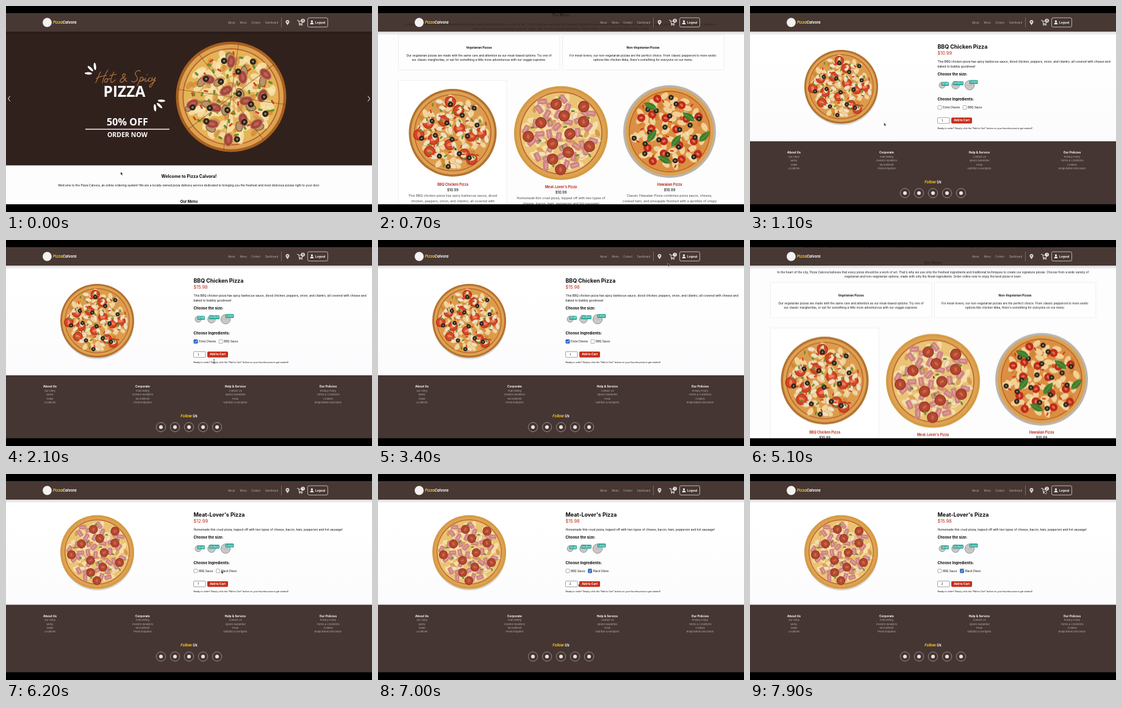
An HTML page for the animation above (8000 ms loop, 600 by 338 pixels).

```html
<!DOCTYPE html>
<html lang="en">
<head>
<meta charset="utf-8">
<title>Pizza ordering</title>
<style>
html, body { margin: 0; width: 100%; height: 100%; overflow: hidden; background: #000; }
svg { display: block; width: 100vw; height: 100vh; }
text { font-family: Inter, "Open Sans", sans-serif; fill: #0b0b0c; white-space: pre; }
.m { text-anchor: middle; }
.b { font-weight: 700; }
.l { font-weight: 300; fill: #d3cccb; }
.i { font-style: italic; }
.w { fill: #fff; }
.red { fill: #b92a17; }
.grey { fill: #45454a; }
.yellow { fill: #fcc419; }
.hero { font-family: "Open Sans", sans-serif; font-weight: 700; fill: #fff; text-anchor: middle; }
.line { fill: none; stroke: #fff; stroke-linecap: round; stroke-linejoin: round; }
#scroll { animation: scroll 8s infinite; }
#cursor { animation: cursor 8s infinite ease-in-out; }
@keyframes scroll {
  0%, 1.25% { transform: translateY(0); animation-timing-function: ease-in-out; }
  8%, 49.9% { transform: translateY(-306px); animation-timing-function: step-end; }
  50%, 58.5% { transform: translateY(0); animation-timing-function: ease-in-out; }
  65%, 100% { transform: translateY(-306px); }
}
@keyframes cursor {
  0%, 2% { transform: translate(188px, 272px); }
  8%, 12% { transform: translate(126px, 232px); }
  16%, 18% { transform: translate(361px, 130px); }
  21%, 23% { transform: translate(311px, 166px); }
  26%, 27% { transform: translate(341px, 196px); }
  30%, 33% { transform: translate(347px, 187px); }
  42.5% { transform: translate(475px, 38px); }
  48%, 50.5% { transform: translate(92px, 27px); }
  56.5%, 59% { transform: translate(266px, 273px); }
  64%, 68% { transform: translate(300px, 222px); }
  71%, 73% { transform: translate(361px, 122px); }
  77.5% { transform: translate(353px, 158px); }
  79%, 81% { transform: translate(348px, 158px); }
  84.5%, 86.5% { transform: translate(323px, 180px); }
  89.5%, 92% { transform: translate(347px, 180px); }
  98%, 100% { transform: translate(483px, 27px); }
}
</style>
</head>
<body>
<svg id="stage" viewBox="0 0 600 338" preserveAspectRatio="none"></svg>
<script>
const LOOP = 8000;
const BRAND = 'Calvora';

// y is the middle of the capitals
const text = (x, y, size, str, cls = '') =>
  `<text x="${x}" y="${y + size * .355}" font-size="${size}" class="${cls}">${str}</text>`;
const rect = (x, y, w, h, fill, extra = '') =>
  `<rect x="${x}" y="${y}" width="${w}" height="${h}" fill="${fill}" ${extra}/>`;
const disc = (x, y, r, fill, extra = '') =>
  `<circle cx="${x}" cy="${y}" r="${r}" fill="${fill}" ${extra}/>`;
const oval = (rx, ry, fill, extra = '') => `<ellipse rx="${rx}" ry="${ry}" fill="${fill}" ${extra}/>`;
const path = (d, cls = '', extra = '') => `<path d="${d}" class="${cls}" ${extra}/>`;
const place = (id, x, y, r) => `<use href="#${id}" transform="translate(${x} ${y}) scale(${r / 50})"/>`;
const on = (times, body) => `<g data-on="${times}">${body}</g>`;
const range = n => [...Array(n).keys()];

function random(seed) {
  return () => {
    seed = (seed + 0x6D2B79F5) | 0;
    let v = Math.imul(seed ^ seed >>> 15, 1 | seed);
    v = v + Math.imul(v ^ v >>> 7, 61 | v) ^ v;
    return ((v ^ v >>> 14) >>> 0) / 4294967296;
  };
}

const toppings = {
  cheese: oval(5, 3, '#f8e7b4', 'opacity=".75"'),
  toast: oval(4, 2.4, '#c97a2c', 'opacity=".55"'),
  pepperoni: disc(0, 0, 5.6, '#b4472f', 'stroke="#8c3020" stroke-width=".8"') + oval(2.5, 1.5, '#cb6648'),
  sausage: oval(6, 4, '#a5463d', 'stroke="#c98a63" stroke-width=".8"') + oval(3, 1.5, '#ba6052'),
  ham: rect(-5, -3, 10, 6, '#cf8583', 'rx="1.5"') + rect(-3, -1, 6, 1.2, '#e3a8a0'),
  tomato: disc(0, 0, 6, '#d4452b', 'stroke="#b23019" stroke-width="1"') + oval(3.4, 1.8, '#ec8055'),
  cherry: disc(0, 0, 4.4, '#bf2b1c') + oval(2, 1.2, '#e4704f'),
  olive: disc(0, 0, 2.8, '#29231e') + disc(0, 0, 1.1, '#8d7a4c'),
  basil: path('M-8 0Q-2-7 8 0Q-1 7-8 0', '', 'fill="#3f7d2c"') + rect(-7, -.3, 13, .6, '#6ba24c'),
  mushroom: oval(4.6, 3, '#b99268', 'stroke="#7a5a3c" stroke-width=".7"'),
  chicken: oval(4.4, 2.6, '#f1dfc0', 'stroke="#cfa36b" stroke-width=".5"'),
  green: rect(-2, -1, 4, 2, '#6c8f2f', 'rx=".8"'),
  pepper: rect(-2, -.8, 4, 1.6, '#cf3f20', 'rx=".6"')
};

function pizza(id, seed, crust, base, list) {
  const rnd = random(seed);
  let out = disc(0, 0, 50, crust) + disc(0, 0, 47.5, '#dda252') + disc(0, 0, 44, '#b9602a') + disc(0, 0, 43, base);
  for (const [kind, count] of list) {
    const turn = rnd() * 6.28;
    for (const i of range(count)) {
      const a = turn + i * 2.4 + rnd() * .5, r = 39.5 * Math.sqrt((i + .4 + rnd() * .3) / count);
      out += `<g transform="translate(${r * Math.cos(a)} ${r * Math.sin(a)}) rotate(${rnd() * 360})">${toppings[kind]}</g>`;
    }
  }
  return `<g id="${id}">${out}</g>`;
}

const slices = range(4).map(i => rect(-50, -.3, 100, .6, '#7a4218', `opacity=".6" transform="rotate(${i * 45 + 8})"`)).join('');
const petals = [2, 44, 84].map(a => `<ellipse cx="12" rx="6" ry="2" fill="#fff" transform="rotate(${a})"/>`).join('');

const defs = `<defs>
  <linearGradient id="shade" x2="0" y2="1"><stop stop-opacity=".16"/><stop offset="1" stop-opacity="0"/></linearGradient>
  <linearGradient id="paper" x2="0" y2="1"><stop offset=".2" stop-color="#fff"/><stop offset="1" stop-color="#f9f9fc"/></linearGradient>
  <g id="petals">${petals}</g><g id="slices">${slices}</g>
  ${pizza('spicy', 4, '#a9601f', '#e5b457', [['cheese', 75], ['toast', 34], ['pepper', 30], ['green', 46], ['mushroom', 13], ['sausage', 13], ['olive', 15]])}
  ${pizza('bbq', 11, '#b5712f', '#dd9c4c', [['cheese', 46], ['toast', 26], ['tomato', 13], ['chicken', 36], ['pepper', 30], ['green', 28], ['olive', 14]])}
  ${pizza('meat', 23, '#d59a42', '#eac374', [['cheese', 60], ['toast', 16], ['chicken', 18], ['ham', 36], ['pepperoni', 12], ['green', 12]])}
  ${pizza('hawaiian', 37, '#b9b4ae', '#dc8f42', [['toast', 30], ['cheese', 56], ['pepper', 20], ['cherry', 17], ['olive', 19], ['basil', 6]])}
</defs>`;

const script = [
  'M155 108c-3 6-5 12-8 18M167 105c-5 8-8 15-9 21M148 119c6-4 12-4 17-5',
  'M165 119c-4 1-5 6-2 6 4 0 5-6 2-6 2 2 4 1 6 0',
  'M177 108c-3 6-6 14-5 17 2 2 5-2 7-4M170 114c4-1 8-1 11-2',
  'M198 124c-4-4-9-9-6-12 3-2 5 1 2 4-4 3-8 5-7 8 2 3 7-1 10-6',
  'M220 107c-3-3-9 1-8 5 1 3 5 5 3 9-2 4-8 5-9 2',
  'M221 117c-2 5-4 10-6 14M220 119c3-4 6-2 4 2-1 3-4 3-5 2 4 1 6-1 8-3',
  'M229 118c-1 3-2 6 0 6 2 0 3-2 4-3M231 113l.5-.5',
  'M237 118c-3-1-5 5-2 6 2 0 4-2 5-3',
  'M240 117c-2 4 0 6 2 4l3-4c-2 6-4 13-8 16-3 1-2-3 1-5l7-6'
].join('');

const hero = rect(0, 42, 600, 219.5, '#31211d')
  + `<use href="#petals" transform="translate(147 111) rotate(180)"/><use href="#petals" transform="translate(243 155)"/>`
  + path(script, 'line', 'style="stroke:#b9783c" stroke-width="1.1" role="img" aria-label="Hot &amp; Spicy"')
  + text(194, 140.5, 24.6, 'PIZZA', 'hero')
  + text(199, 190.5, 16.2, '50% OFF', 'hero')
  + rect(130, 201.5, 138, 1.4, '#fff')
  + text(199, 211, 10.6, 'ORDER NOW', 'hero')
  + place('spicy', 369, 149, 90.5) + place('slices', 369, 149, 88)
  + path('M6.5 148l-3 4 3 4M593.5 148l3 4-3 4', 'line', 'stroke-width="1"');

const panel = (x, title, lines) =>
  rect(x, 353, 264.5, 58, '#fefefe', 'rx="2" stroke="#e7e7ec" stroke-width=".7"')
  + text(x + 132, 374.5, 4.8, title, 'm b')
  + lines.map((s, i) => text(x + 132, 387 + i * 7.5, 4.85, s, 'm')).join('');

const card = (id, x, y, r, top, title, lines) =>
  place(id, x, y, r) + text(x, top, 5.5, title, 'm b red') + text(x, top + 9, 5.6, '$10.99', 'm b grey')
  + lines.map((s, i) => text(x, top + 18 + i * 9, 5.4, s, 'm grey')).join('');

const home = rect(0, 12, 600, 314, '#fdfdfe') + `<g id="scroll">${hero}`
  + text(300, 279.5, 7, `Welcome to Pizza ${BRAND}!`, 'm b')
  + text(300, 294.5, 4.85, `Welcome to the Pizza ${BRAND}, an online ordering system! We are a locally-owned pizza delivery service dedicated to bringing you the freshest and most delicious pizzas right to your door.`, 'm')
  + text(300, 321, 5.9, 'Our Menu', 'm b')
  + text(300, 336, 4.85, `In the heart of the city, Pizza ${BRAND} believes that every pizza should be a work of art. That's why we use only the freshest ingredients and traditional techniques to create our signature pizzas. Choose from a wide variety of`, 'm')
  + text(300, 343.5, 4.85, 'vegetarian and non-vegetarian options, made with only the finest ingredients. Order online now to enjoy the best pizza in town.', 'm')
  + panel(33.5, 'Vegetarian Pizzas', ['Our vegetarian pizzas are made with the same care and attention as our meat-based options. Try one of', 'our classic margheritas, or opt for something a little more adventurous with our veggie supreme.'])
  + panel(302.5, 'Non-Vegetarian Pizzas', ['For meat-lovers, our non-vegetarian pizzas are the perfect choice. From classic pepperoni to more exotic', "options like chicken tikka, there's something for everyone on our menu."])
  + rect(33.5, 428, 177.5, 230, '#fff', 'stroke="#f0f0f3" stroke-width="1"')
  + card('bbq', 122.5, 514, 72, 599.5, 'BBQ Chicken Pizza', ['This BBQ chicken pizza has spicy barbecue sauce, diced', 'chicken, peppers, onion, and cilantro, all covered with'])
  + card('meat', 300, 514.5, 77, 603.5, "Meat-Lover's Pizza", ['Homemade thin crust pizza, topped off with two types of', 'cheese, bacon, ham, pepperoni and hot sausage!'])
  + card('hawaiian', 478, 512, 76, 599.5, 'Hawaiian Pizza', ['Classic Hawaiian Pizza combines pizza sauce, cheese,', 'cooked ham, and pineapple finished with a sprinkle of crispy'])
  + '</g>';

const columns = [
  ['About Us', 'Our Story', 'Menu', 'Deals', 'Locations'],
  ['Corporate', 'Franchising', 'Investor Relations', 'Recruitment', 'Press Enquiries'],
  ['Help &amp; Service', 'Contact Us', 'Speed Guarantee', 'FAQs', 'Nutrition &amp; Allergens'],
  ['Our Policies', 'Privacy Policy', 'Terms &amp; Conditions', 'Cookies', 'Responsible Disclosure']
];
const footer = rect(0, 222, 600, 120, '#453633')
  + columns.map(([head, ...links], c) => {
    const x = 72 + c * 152;
    return text(x, 240.5, 4.85, head, 'm b w') + links.map((s, i) => text(x, 247.5 + i * 6.3, 4.1, s, 'm l')).join('');
  }).join('')
  + text(300, 288.5, 5.85, '<tspan class="yellow">Follow</tspan> Us', 'm b i w')
  + range(5).map(i => disc(254 + i * 23, 307, 7.7, 'none', 'stroke="#b5acaa" stroke-width=".7"') + disc(254 + i * 23, 307, 3, '#e8e4e3')).join('');

const size = (x, r, label, lx, ly, w) =>
  disc(x, 130, r, '#c9c9c9', 'stroke="#777" stroke-width=".7"')
  + `<g opacity=".55">${place('slices', x, 130, r)}</g>`
  + rect(lx, ly, w, 6.6, '#2fa898', 'rx="1.5"') + text(lx + w / 2, ly + 3.2, 4.2, label, 'm w');

const box = (x, label, tickTimes) =>
  rect(x, 163.5, 6, 6, '#fff', 'rx="1" stroke="#8a8a8e" stroke-width=".7"')
  + (tickTimes ? on(tickTimes, rect(x - .3, 163.2, 6.6, 6.6, '#2563c4', 'rx="1"')
    + path(`M${x + 1.4} 166.6l1.3 1.4 2.2-3`, 'line', 'stroke-width=".9"')) : '')
  + text(x + 8.3, 166.6, 4.4, label);

function detail(p) {
  return rect(0, 12, 600, 314, 'url(#paper)')
    + disc(150, p.cy + 3, 60, '#000', 'opacity=".15"') + place(p.id, 149.5, p.cy, 60.5)
    + text(307.5, 67, 8.9, p.title, 'b')
    + p.prices.map(([price, times]) => on(times, text(307.5, 77.5, 7.4, price, 'red'))).join('')
    + p.about.map((s, i) => text(307.5, 91.5 + i * 7.5, 4.85, s)).join('')
    + `<g transform="translate(0 ${p.shift})">`
    + text(307.5, 111.5, 6.03, 'Choose the size:', 'b')
    + size(315, 5, 'Small', 313.5, 124.5, 12.5) + size(337, 6.3, 'medium', 332.5, 123.5, 17.5) + size(360, 7.8, 'Large', 359.5, 121.5, 14)
    + text(307.5, 153, 6.03, 'Choose Ingredients:', 'b') + p.boxes
    + rect(307.5, 183.2, 19.5, 9.4, '#fff', 'rx="1" stroke="#77777b" stroke-width=".7"')
    + p.counts.map(([n, times]) => on(times, text(315, 188, 4.9, n, 'm'))).join('')
    + rect(330, 183, 34, 9.8, '#c6301c', 'rx="1.8"') + text(347, 187.8, 4.65, 'Add to Cart', 'm b w')
    + text(307.5, 200.3, 3.67, 'Ready to order? Simply click the "Add to Cart" button on your favorite pizza to get started!')
    + footer + '</g>';
}

const bbq = detail({
  id: 'bbq', cy: 132.5, shift: 0, title: 'BBQ Chicken Pizza',
  prices: [['$10.99', '880 1380'], ['$12.99', '1380 1780'], ['$15.98', '1780 4000']],
  about: ['This BBQ chicken pizza has spicy barbecue sauce, diced chicken, peppers, onion, and cilantro, all covered with cheese and', 'baked to bubbly goodness!'],
  boxes: box(308, 'Extra Cheese', '1780 4000') + box(349, 'BBQ Sauce'),
  counts: [['1', '880 4000']]
});
const meat = detail({
  id: 'meat', cy: 128, shift: -7.5, title: "Meat-Lover's Pizza",
  prices: [['$10.99', '5400 5780'], ['$12.99', '5780 6380'], ['$15.98', '6380 8000']],
  about: ['Homemade thin crust pizza, topped off with two types of cheese, bacon, ham, pepperoni and hot sausage!'],
  boxes: box(308, 'BBQ Sauce') + box(344.5, 'Black Olives', '6380 8000'),
  counts: [['1', '5400 6850'], ['2', '6850 8000']]
});

const header = rect(0, 12.5, 600, 29.5, '#33231f', 'opacity=".9"') + rect(0, 42, 600, 6, 'url(#shade)')
  + disc(67.5, 27, 7.4, '#f4f2f1')
  + text(77, 27.3, 5.9, `<tspan class="yellow">Pizza</tspan>${BRAND}`, 'b i w')
  + [[364, 'About'], [383.5, 'Menu'], [402, 'Contact'], [425, 'Dashboard']].map(([x, s]) => text(x, 27.3, 4.2, s, 'l')).join('')
  + rect(451.3, 19, .7, 16, '#8d8280')
  + path('M461.5 31.5c-1.5-2.5-3-4-3-5.5a3 3 0 0 1 6 0c0 1.5-1.5 3-3 5.5z', '', 'fill="#ddd8d7"') + disc(461.5, 26, 1.1, '#473935')
  + path('M477.5 23.5h1.8l1.7 5.5h4.5l1.2-4h-6.5M481 29l-.5 1.2h5.5', 'line', 'stroke-width=".8"')
  + disc(481.5, 31.5, .8, '#fff') + disc(485, 31.5, .8, '#fff') + disc(486.7, 24, 3.1, '#fff')
  + [['0', '0 2600'], ['1', '2600 7380'], ['2', '7380 8000']].map(([n, times]) => on(times, text(486.7, 24, 4.5, n, 'm b'))).join('')
  + rect(494.5, 19.3, 33, 15.2, 'none', 'rx="2.5" stroke="#e8e4e3" stroke-width=".7"')
  + disc(501.5, 25, 1.6, '#fff') + path('M498.7 30c0-4 5.6-4 5.6 0z', 'w')
  + text(507, 27.2, 4.8, 'Logout', 'b w');

const cursor = `<g id="cursor">`
  + on('0 2060 2220 4420 4720 8000', path('M0 0v5.2l1.2-1 .9 2 .9-.4-.9-1.9h1.7z', '', 'fill="#111" stroke="#fff" stroke-width=".4"'))
  + on('2060 2220 4420 4720', path('M-1 0h2M0 0v6M-1 6h2', 'line', 'style="stroke:#222" stroke-width=".6"'))
  + '</g>';

const stage = document.getElementById('stage');
stage.innerHTML = defs + on('0 880 4000 5400', home) + on('880 4000', bbq) + on('5400 8000', meat)
  + header + cursor + rect(0, 0, 600, 12.5, '#000') + rect(0, 325.3, 600, 13, '#000');

// data-on lists alternating show and hide times
for (const el of stage.querySelectorAll('[data-on]')) {
  const times = el.dataset.on.split(' ').map(Number);
  const frames = times.map((t, i) => ({ opacity: i % 2 ? 0 : 1, offset: t / LOOP, easing: 'step-end' }));
  if (times[0] > 0) frames.unshift({ opacity: 0, offset: 0, easing: 'step-end' });
  if (times.at(-1) < LOOP) frames.push({ opacity: 0, offset: 1 });
  el.animate(frames, { duration: LOOP, iterations: Infinity });
}
</script>
</body>
</html>
```
